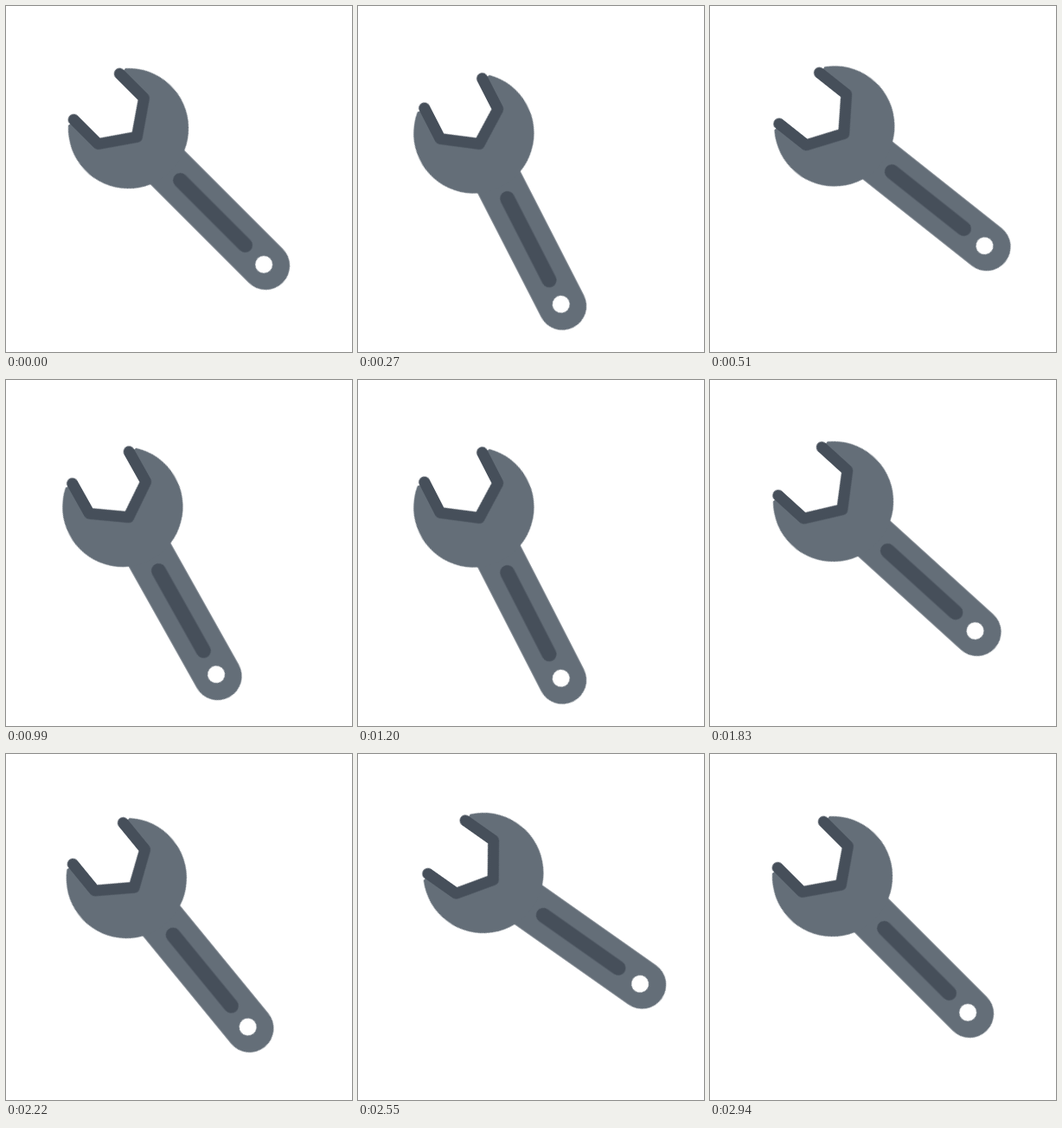
An HTML page without scripts for the animation above (4.97 s loop, 400 by 400 pixels).

```html
<!DOCTYPE html>
<html lang="en">
<head>
<meta charset="utf-8">
<title>Wrench</title>
<style>
  html, body { margin: 0; width: 100%; height: 100%; overflow: hidden; background: #fff; }
  svg { display: block; width: 100%; height: 100%; }

  .steel { fill: #646e78; }
  .handle, .slot, .jaw { fill: none; stroke-linecap: round; stroke-linejoin: round; }
  .handle { stroke: #646e78; stroke-width: 55.6; }
  .slot { stroke: #464f5a; stroke-width: 17; }
  .jaw { stroke: #464f5a; stroke-width: 13; }

  /* Quick turn one way, slower return, then rest. */
  .wrench { transform-origin: 0 0; animation: turn 4970ms infinite; }
  @keyframes turn {
    0% { transform: rotate(0deg); animation-timing-function: cubic-bezier(.5, 0, .6, 1); }
    2.716%, 21.429% { transform: rotate(22.3deg); animation-timing-function: cubic-bezier(.46, 0, .2, 1); }
    14.789%, 33.501% { transform: rotate(-10.1deg); animation-timing-function: cubic-bezier(.79, 0, .63, 1); }
    40.141% { transform: rotate(22.3deg); animation-timing-function: cubic-bezier(.5, 0, .3, 1); }
    50.704% { transform: rotate(-10.1deg); animation-timing-function: cubic-bezier(.3, 0, .1, 1); }
    59.155%, 100% { transform: rotate(0deg); }
  }
</style>
</head>
<body>
<svg viewBox="0 0 400 400">
  <!-- The x axis runs along the handle, with the pivot in the jaw. -->
  <g transform="translate(120 120) rotate(45)">
    <g class="wrench">
      <path class="handle" d="M70 0H254.9"/>
      <path class="steel" d="M-21.2 46.7A69.6 69.6 0 1 0 -21.2 -46.7L-20 -39L18 -38L44 0L18 38L-20 39Z"/>
      <path class="jaw" d="M-21.5 37.6H18.3L44.3 0L18.3 -37.6H-21.5"/>
      <path class="slot" d="M115.3 0H221.3"/>
      <circle cx="252.4" cy=".5" r="10" fill="#fff"/>
    </g>
  </g>
</svg>
</body>
</html>
```
